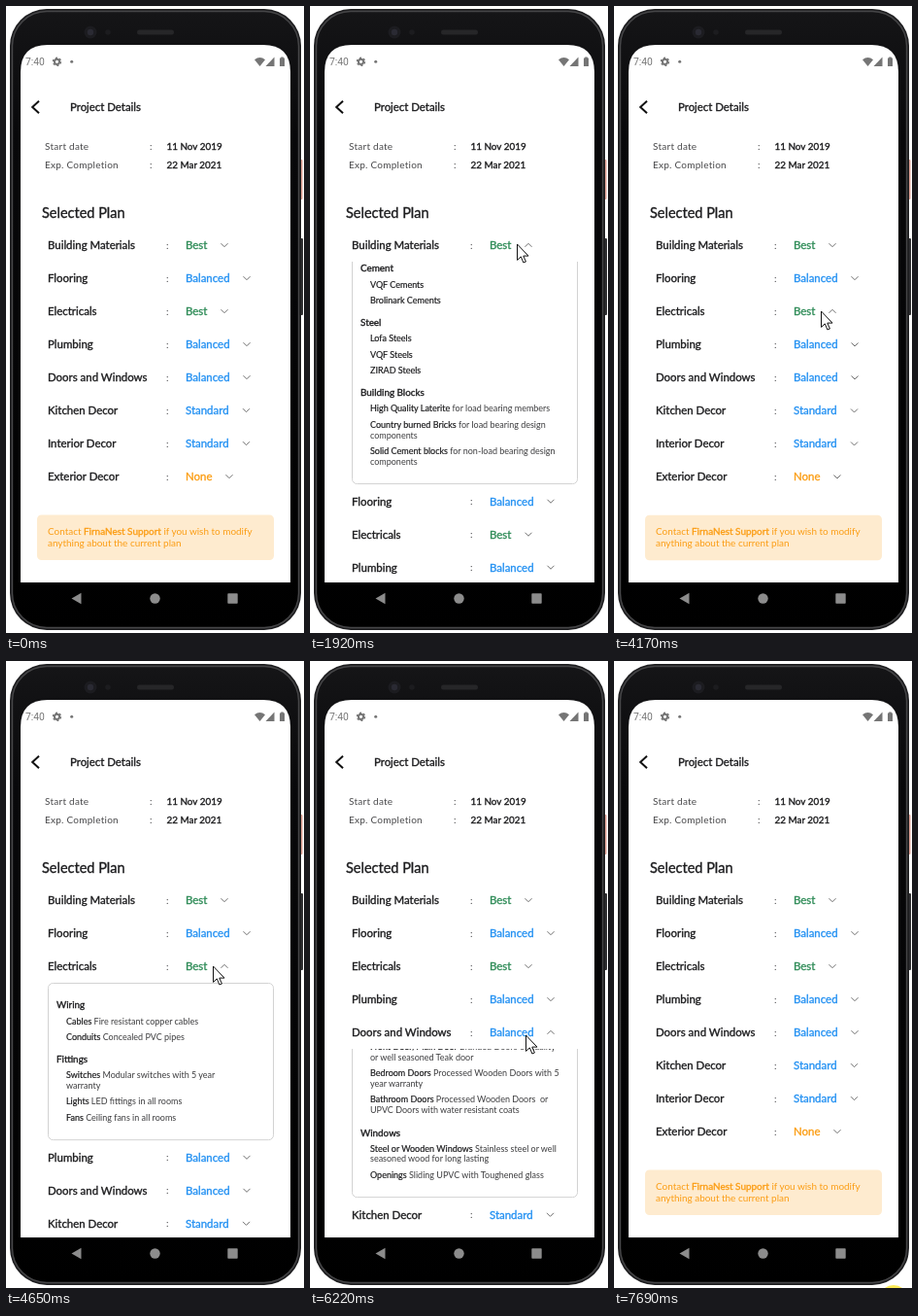
Recreate the animation shown at these times as an HTML page. Size 307 by 645 pixels, loop 7720 ms.

```html
<!DOCTYPE html>
<html lang="en">
<head>
<meta charset="utf-8">
<title>Project Details</title>
<style>
  html, body { margin: 0; width: 100%; height: 100%; overflow: hidden; background: #fff; }
  svg { display: block; width: 307px; height: 645px; }
  text { font-family: Lato, sans-serif; fill: #1c1c1e; white-space: pre; }
  .semi { stroke: currentColor; stroke-width: .35px; color: #1c1c1e; }
  .soft { fill: #3c3c3e; }
  .soft .semi { stroke-width: .2px; fill: #1c1c1e; }
  .date { fill: #48484a; letter-spacing: .25px; }
  .note, .note .semi { fill: #fb9d14; color: #fb9d14; }
  .status { font-family: Roboto, sans-serif; fill: #757575; }
  .chevron { fill: none; stroke: #5e5e5e; stroke-width: .9; }
</style>
</head>
<body>
<svg viewBox="0 0 307 645" xmlns="http://www.w3.org/2000/svg">
  <defs>
    <clipPath id="screen"><path d="M15 593V68Q15 40 43 40H265Q293 40 293 68V593Z"/></clipPath>
    <linearGradient id="bezel" x2="0" y2="1">
      <stop stop-color="#151517"/>
      <stop offset=".2" stop-color="#08080a"/>
      <stop offset="1" stop-color="#000"/>
    </linearGradient>
  </defs>

  <rect x="302" y="158" width="3.5" height="41" rx="1" fill="#dc9c90"/>
  <rect x="302" y="239" width="4" height="79" rx="1" fill="#2d2d2f"/>
  <rect x="4" y="3" width="300" height="639" rx="38" fill="#1e1e20"/>
  <rect x="6.5" y="5.5" width="295" height="634" rx="35.5" fill="url(#bezel)" stroke="#454547" stroke-width="1.4"/>
  <circle cx="87" cy="27" r="6.5" fill="#1c1c20"/>
  <circle cx="87" cy="27" r="3.2" fill="#2a2a33"/>
  <circle cx="105" cy="27" r="2.8" fill="#1c1c1f"/>
  <rect x="135" y="24.5" width="38" height="5" rx="2.5" fill="#262628"/>

  <g clip-path="url(#screen)">
    <rect x="15" y="40" width="278" height="553" fill="#fff"/>
    <text class="status" x="20" y="61" font-size="10.3">7:40</text>
    <g fill="#757575">
      <circle cx="52.5" cy="57.3" r="2.6" fill="none" stroke="#757575" stroke-width="2"/>
      <circle cx="52.5" cy="57.3" r="4" fill="none" stroke="#757575" stroke-width="1.4" stroke-dasharray="2.1 2.09"/>
      <circle cx="67.7" cy="57.2" r="1.5"/>
      <path d="M256 55.2Q261.5 50.8 267 55.2L261.5 62Z"/>
      <path d="M276.5 52.5V62H267.5Z"/>
      <path d="M282 53.5H283.2V52.4H285.8V53.5H287V62H282Z"/>
    </g>
    <path d="M34 97.7L27.2 104L34 110.3" fill="none" stroke="#111" stroke-width="2"/>
    <text class="semi" x="66" y="108" font-size="11.4">Project Details</text>
    <text class="date" x="40" y="148" font-size="10">Start date</text>
    <text class="date" x="40" y="166.5" font-size="10">Exp. Completion</text>
    <text class="date" x="148" y="148" font-size="10">:</text>
    <text class="date" x="148" y="166.5" font-size="10">:</text>
    <text class="semi" x="165.5" y="148" font-size="9.9">11 Nov 2019</text>
    <text class="semi" x="165.5" y="166.5" font-size="9.9">22 Mar 2021</text>
    <text class="semi" x="37" y="217.5" font-size="14.5">Selected Plan</text>
    <g id="plan"></g>
    <g id="banner" class="note">
      <rect x="32" y="523.5" width="244" height="46.5" rx="4.5" fill="#feebcf"/>
      <text class="note" x="43" y="544" font-size="9.95">Contact <tspan class="semi">FirnaNest Support</tspan> if you wish to modify</text>
      <text class="note" x="43" y="556" font-size="9.95">anything about the current plan</text>
    </g>
  </g>

  <g fill="#8c8c8c">
    <path d="M67.5 609.5L77.5 603.8V615.2Z"/>
    <circle cx="153.5" cy="609.5" r="5.2"/>
    <rect x="228.3" y="604.3" width="10.4" height="10.4" rx=".8"/>
  </g>

  <circle id="halo" r="15" fill="#f9e31c" fill-opacity=".75"/>
  <path id="cursor" d="M0 0V16.4L3.8 12.9L6.4 19L8.9 18L6.3 12.1H11.5Z" fill="#fff" stroke="#111" stroke-width="1" stroke-linejoin="round"/>
</svg>
<script>
const LOOP = 7720, SLIDE = 540, TOP = 246, STEP = 34;
const $ = id => document.getElementById(id);
const GREEN = '#2e8b57', BLUE = '#2491f2', ORANGE = '#fb9d14';

// label, grade, colour, chevron x
const rows = [
  ['Building Materials', 'Best', GREEN, 225],
  ['Flooring', 'Balanced', BLUE, 248],
  ['Electricals', 'Best', GREEN, 225],
  ['Plumbing', 'Balanced', BLUE, 248],
  ['Doors and Windows', 'Balanced', BLUE, 248],
  ['Kitchen Decor', 'Standard', BLUE, 247.5],
  ['Interior Decor', 'Standard', BLUE, 247.5],
  ['Exterior Decor', 'None', ORANGE, 230]
];

// '#' heading, '+' wrapped line, otherwise an item; text before '|' is bold
const details = {
  0: ['#Cement', 'VQF Cements|', 'Brolinark Cements|',
      '#Steel', 'Lofa Steels|', 'VQF Steels|', 'ZIRAD Steels|',
      '#Building Blocks', 'High Quality Laterite| for load bearing members',
      'Country burned Bricks| for load bearing design', '+components',
      'Solid Cement blocks| for non-load bearing design', '+components'],
  2: ['#Wiring', 'Cables| Fire resistant copper cables', 'Conduits| Concealed PVC pipes',
      '#Fittings', 'Switches| Modular switches with 5 year', '+warranty',
      'Lights| LED fittings in all rooms', 'Fans| Ceiling fans in all rooms'],
  4: ['#Doors', 'Front Door/Main Door| Branded Doors of quality', '+or well seasoned Teak door',
      'Bedroom Doors| Processed Wooden Doors with 5', '+year warranty',
      'Bathroom Doors| Processed Wooden Doors  or', '+UPVC Doors with water resistant coats',
      '#Windows', 'Steel or Wooden Windows| Stainless steel or well',
      '+seasoned wood for long lasting', 'Openings| Sliding UPVC with Toughened glass']
};

// row, press, release, slide start, opening?
const taps = [
  [0, 1380, 1530, 1518, true],
  [0, 3030, 3180, 3129, false],
  [2, 4070, 4140, 4130, true],
  [2, 4840, 4930, 4939, false],
  [4, 5680, 5860, 5884, true],
  [4, 6500, 6600, 6590, false],
  [-1, 7690, 7720, 0, false]
];

// time, x, y of the pointer tip
const path = [
  [0, 284, 660], [99, 284, 660], [100, 283, 643], [860, 202, 269], [890, 203, 267],
  [1150, 213.5, 245], [2220, 213.5, 245], [2240, 213.5, 246], [2430, 213.5, 246],
  [2540, 213.5, 249], [3300, 213.5, 249], [3700, 213.5, 308], [3880, 213.5, 308],
  [3910, 213.5, 314], [4950, 213.5, 314], [5310, 221.5, 359], [5430, 222.5, 385],
  [6850, 222.5, 385], [7270, 279, 638], [7340, 280, 640], [7440, 288, 657], [LOOP, 288, 657]
];

function add(parent, tag, attrs, text) {
  const el = document.createElementNS('http://www.w3.org/2000/svg', tag);
  for (const k in attrs) el.setAttribute(k, attrs[k]);
  if (text) el.textContent = text;
  return parent.appendChild(el);
}

function buildPanel(parent, top, lines) {
  const id = 'clip' + top;
  const clip = add(add(parent, 'clipPath', { id }), 'rect', { x: 15, y: top, width: 278, height: 0 });
  const body = add(add(parent, 'g', { 'clip-path': `url(#${id})` }), 'g', {});
  let y = 0, last = '';
  for (const line of lines) {
    const kind = line[0];
    y += !last || kind === '#' ? 23 : kind === '+' ? 10.8 : last === '#' ? 16.5 : 16.3;
    last = kind;
    if (kind === '#') {
      add(body, 'text', { class: 'semi', x: 52, y: y + 3.5, 'font-size': 9.9 }, line.slice(1));
    } else {
      const [bold, rest] = kind === '+' ? ['', line.slice(1)] : line.split('|');
      const text = add(body, 'text', { class: 'soft', x: 62, y: y + 3.1, 'font-size': 9 });
      if (bold) add(text, 'tspan', { class: 'semi' }, bold);
      if (rest) add(text, 'tspan', {}, rest);
    }
  }
  const full = y + 24;
  add(body, 'rect', { x: 43.5, y: .5, width: 232, height: full - 1.5, rx: 5, fill: 'none', stroke: '#d2d2d2' });
  return { clip, body, full, top };
}

const parts = rows.map(([label, grade, color, cx], i) => {
  const y = TOP + i * STEP;
  const group = add($('plan'), 'g', {});
  const panel = details[i] && buildPanel(group, y + 17, details[i]);
  const ripple = panel && add(group, 'circle', { cx, cy: y, r: 0, fill: '#000' });
  const font = { y: y + 4.1, 'font-size': 11.45 };
  add(group, 'text', { class: 'semi', x: 43, ...font }, label);
  add(group, 'text', { class: 'date', x: 165, y: y + 3.6, 'font-size': 10 }, ':');
  add(group, 'text', { class: 'semi', x: 185, ...font, style: `fill:${color};color:${color}` }, grade);
  const chevron = add(group, 'path', { class: 'chevron', d: 'M-3.5 -1.8L0 1.7L3.5 -1.8' });
  return { group, panel, ripple, chevron, cx, y };
});

const clamp = v => Math.max(0, Math.min(1, v));
const ease = t => t < .5 ? 4 * t ** 3 : 1 - 4 * (1 - t) ** 3;
const move = (el, x, y) => el.setAttribute('transform', `translate(${x} ${y})`);

function openness(row, time) {
  let amount = 0, open = false;
  for (const [r, , , start, opening] of taps) {
    if (r !== row || time < start) continue;
    const p = ease(clamp((time - start) / SLIDE));
    amount = opening ? p : 1 - p;
    open = opening;
  }
  return { amount, open };
}

function drawRipple(part, row, time) {
  const tap = taps.find(([r, press]) => r === row && time >= press + 150 && time < press + 450);
  const age = tap ? time - tap[1] - 150 : 0;
  part.ripple.setAttribute('r', 24.5 * clamp(age / 90));
  part.ripple.setAttribute('fill-opacity', tap ? .055 * clamp((300 - age) / 120) : 0);
}

function pointer(time) {
  const i = Math.max(1, path.findIndex(p => p[0] > time));
  const [t0, x0, y0] = path[i - 1], [t1, x1, y1] = path[i];
  const p = clamp((time - t0) / (t1 - t0));
  return [x0 + (x1 - x0) * p, y0 + (y1 - y0) * p];
}

function draw(time) {
  let shift = 0;
  parts.forEach((part, i) => {
    move(part.group, 0, shift);
    let flip = 1;
    if (part.panel) {
      const { clip, body, full, top } = part.panel;
      const { amount, open } = openness(i, time);
      const h = full * amount;
      clip.setAttribute('height', h);
      move(body, 0, top + h - full);
      shift += h;
      if (open) flip = -1;
      drawRipple(part, i, time);
    }
    part.chevron.setAttribute('transform', `translate(${part.cx} ${part.y}) scale(1 ${flip})`);
  });
  move($('banner'), 0, shift);

  const [x, y] = pointer(time);
  move($('cursor'), x, y);
  move($('halo'), x, y);
  const pressed = taps.some(([, down, up]) => time >= down && time < up);
  $('halo').setAttribute('visibility', pressed ? 'visible' : 'hidden');
}

function tick() {
  draw(performance.now() % LOOP);
  requestAnimationFrame(tick);
}
tick();
</script>
</body>
</html>
```
